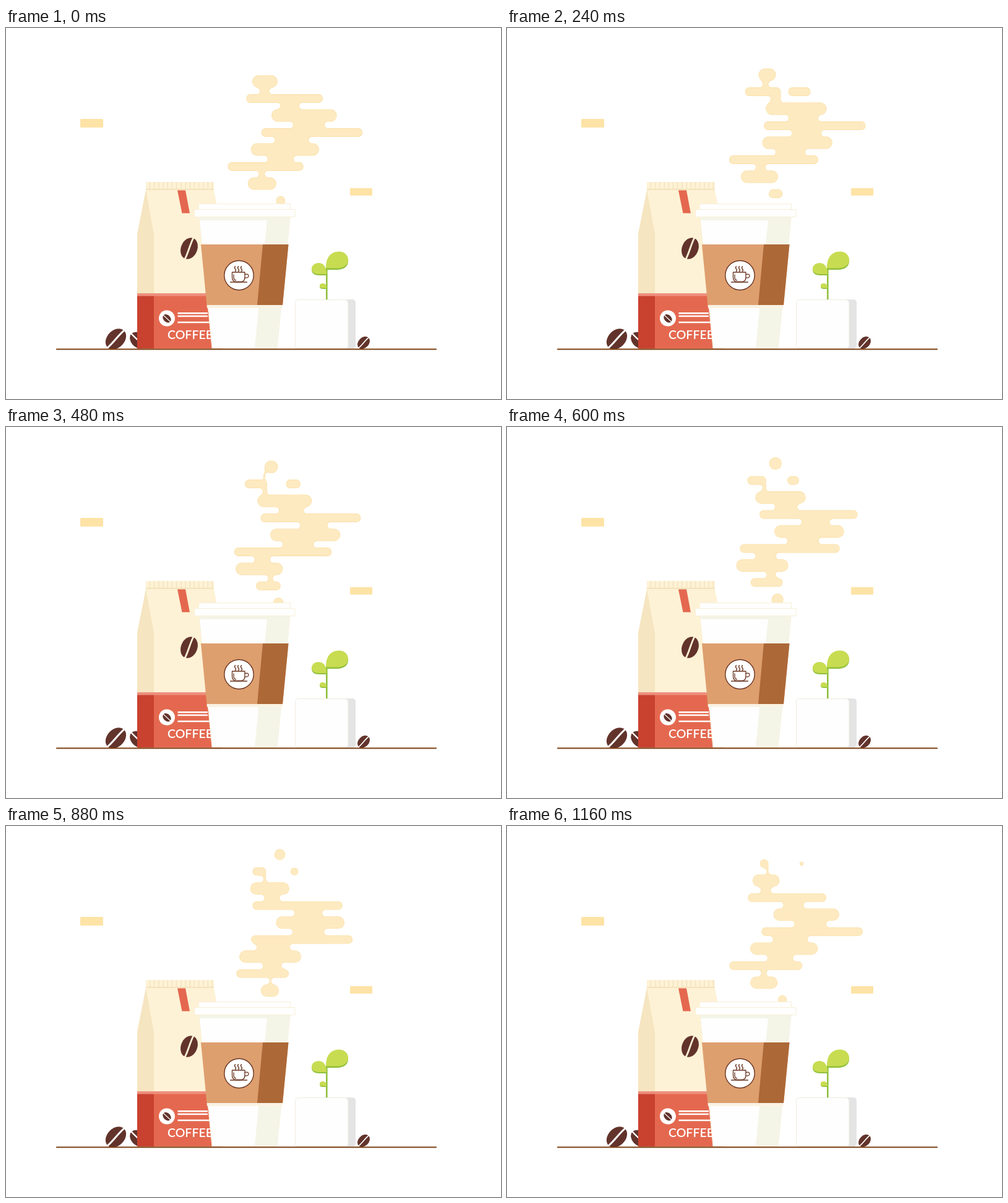
An HTML page for the animation above (1.2 s loop, 800 by 600 pixels).

```html
<!DOCTYPE html>
<html lang="en">
<head>
<meta charset="utf-8">
<title>Coffee to go</title>
<style>
  html, body { margin: 0; width: 100%; height: 100%; overflow: hidden; background: #fff; }
  svg { display: block; width: 100vw; height: 100vh; }
  #steam { fill: #fdeac1; stroke: #fbdc9b; stroke-width: 1.2; paint-order: stroke; }
  .dash { fill: #fee3a6; }
  .cream { fill: #fef2d6; }
  .fold { fill: #f5e5c0; }
  .red { fill: #e4684f; }
  .paper { fill: #fefefe; }
  .shade { fill: #f4f4e7; }
  .edge { stroke: #f7efd8; stroke-width: 1; }
  .leaf { fill: #c8dc51; }
  .under { fill: #90c03d; }
  .icon { fill: none; stroke: #6b3623; stroke-width: 1.3; stroke-linecap: round; stroke-linejoin: round; }
  .label { font: 600 19.5px Lato, "Open Sans", sans-serif; fill: #fff; }
</style>
</head>
<body>
<svg viewBox="0 0 800 600" preserveAspectRatio="xMidYMid meet">
  <defs>
    <g id="bean">
      <ellipse rx="14" ry="19" fill="#62332b"/>
      <path d="M0 -20C-1.5 -8 1.5 8 0 20" fill="none" stroke="currentColor" stroke-width="3"/>
    </g>
    <pattern id="ribs" x="226" y="249" width="7.2" height="14" patternUnits="userSpaceOnUse">
      <rect x="6" width="1.6" height="14" fill="#f0dfb8"/>
    </pattern>
  </defs>

  <rect class="dash" x="120" y="147" width="37" height="14" rx="1.5"/>
  <rect class="dash" x="556" y="259" width="36" height="12" rx="1"/>

  <g color="#fff">
    <use href="#bean" transform="translate(177.5 503) rotate(44)"/>
    <use href="#bean" transform="translate(213.5 505) rotate(-45) scale(.8)"/>
    <use href="#bean" transform="translate(578 509) rotate(44) scale(.6)"/>
  </g>

  <!-- bag -->
  <path class="cream" d="M226 249H336V262L350 333V518H226Z"/>
  <path class="fold" d="M226 262L212 333V518H239V333Z"/>
  <rect x="226" y="249" width="110" height="12" fill="url(#ribs)"/>
  <rect x="226" y="260" width="110" height="2" fill="#f3e2bb"/>
  <path class="red" d="M277 262.5H290L297 299.5H284.5Z"/>
  <rect class="red" x="239" y="433" width="111" height="85.5"/>
  <rect x="212" y="433" width="27" height="85.5" fill="#c9412f"/>
  <rect x="212" y="429" width="138" height="4.500" fill="#ee8f7e"/>
  <use href="#bean" color="#fef2d6" transform="translate(296 356.5) rotate(22) scale(.94)"/>
  <circle cx="260" cy="469.5" r="13" fill="#fff"/>
  <use href="#bean" color="#fff" transform="translate(260 469.8) rotate(-45) scale(.4)"/>
  <path d="M277.5 461.200H326M277.5 466H326M277.5 476H340" stroke="#fff" stroke-width="2.4"/>
  <text class="label" x="261" y="503">COFFEE</text>

  <path id="steam"/>

  <!-- cup -->
  <path class="paper edge" d="M312 306H459L438 518H333Z"/>
  <path class="shade" d="M312.5 306H459L438 518H402L422 311H313Z"/>
  <path d="M324.5 448H447L446.5 453H325Z" fill="#faf3e3"/>
  <path d="M315 350H456.5L447 448H324.5Z" fill="#de9f6f"/>
  <path d="M415 350H456.5L447 448H406Z" fill="#ad6837"/>
  <rect class="paper edge" x="311.5" y="284.5" width="148" height="9.5"/>
  <rect class="paper edge" x="304.5" y="293.5" width="162.5" height="12"/>
  <circle cx="376.5" cy="400" r="23.7" fill="#fff" stroke="#6b3623" stroke-width="1.4"/>
  <g class="icon">
    <path d="M365.5 395H386V403Q386 410.5 379 410.5H372.5Q365.5 410.5 365.5 403Z"/>
    <path d="M386 398.5Q392 397 392 401Q392 404.5 386 404"/>
    <path d="M368 399V403Q368 407.5 371.5 408"/>
    <path d="M362.5 411H389.5"/>
    <path d="M370.5 385.5q-2 2.3 0 4.3t0 4M375.5 385.5q-2 2.3 0 4.3t0 4M380.5 385.5q-2 2.3 0 4.3t0 4"/>
  </g>

  <!-- plant -->
  <rect x="500" y="439" width="65" height="79.5" rx="5" fill="#e4e4e4"/>
  <rect class="paper" x="467.5" y="439.5" width="85.5" height="79" rx="5" stroke="#efebe0"/>
  <path d="M518.3 388V439" stroke="#90c03d" stroke-width="2.6"/>
  <path class="under" d="M517.5 391C516 375 524 363 538 363C547 363 553 369 553 377C553 386 545 391 535 391Z"/>
  <path class="leaf" d="M517.5 388.5C516 373 524 361.5 538 361.5C547 361.5 553 367.5 553 375C553 383.5 545 388.5 535 388.5Z"/>
  <path class="under" d="M518 400H506C499 400 494 397 494 391C494 385 499 381 505 381C513 381 518 387 518 400Z"/>
  <path class="leaf" d="M518 398H506C499 398 494 395 494 389.5C494 384 499 380 505 380C513 380 518 386 518 398Z"/>
  <path class="under" d="M518 422H512Q507 422 507 418Q507 414 512 414Q518 414 518 422Z"/>
  <path class="leaf" d="M518 420.5H512Q507 420.5 507 417Q507 413 512 413Q518 413 518 420.5Z"/>

  <path d="M82 519.5H695" stroke="#7b3f10" stroke-width="2.2" stroke-linecap="round"/>
</svg>

<script>
const LOOP = 1200, STEP = 40;
const RISE = 55, GAP = RISE / 2, NOTCH = 6;
const FAT_H = 18.6, THIN_H = 12.6;
const FAT_END = 45, THIN_END = 60, SPLIT_Y = 112;

// An edge swings between [height, x] turning points on half cosine waves
function swing(...turns) {
  return y => {
    let i = 0;
    while (i < turns.length - 2 && turns[i + 1][0] < y) i++;
    const [y0, x0] = turns[i], [y1, x1] = turns[i + 1];
    const u = Math.min(1, Math.max(0, (y - y0) / (y1 - y0)));
    return x0 + (x1 - x0) * (1 - Math.cos(Math.PI * u)) / 2;
  };
}

const fat = {
  left: swing([36, 437], [98, 395], [158, 437], [225, 371], [295, 436]),
  right: swing([44, 451], [76, 434], [160, 547], [247, 436], [296, 450])
};
const thin = {
  left: swing([45, 415], [100, 385], [161, 416], [219, 358], [290, 442]),
  right: swing([50, 482], [81, 470], [159, 579], [259, 443], [295, 456])
};
const belowFat = {
  left: swing([75, 419], [102, 411], [163, 466], [228, 416], [258, 430]),
  right: swing([78, 416], [98, 424], [162, 516], [250, 430])
};
const belowThin = {
  left: swing([70, 421], [98, 414], [156, 477], [203, 402], [226, 403], [258, 430]),
  right: swing([70, 422], [98, 418], [152, 521], [230, 416], [258, 430])
};

const fmt = pts => pts.map(p => p[0].toFixed(2) + " " + p[1].toFixed(2)).join(" ");

function pill({ l, r, y, h }) {
  const c = Math.min(h, r - l) / 2;
  if (c < 0.4) return "";
  const arc = `A${c} ${c} 0 0 1 `, start = fmt([[l + c, y - c]]);
  return `M${start}H${r - c}${arc}${fmt([[r - c, y + c]])}H${l + c}${arc}${start}Z`;
}

// Concave curve from a row to the waist of a neck
function flare(row, edge, x, y, dir) {
  const dy = y - row.y, down = Math.sign(dy), half = row.h / 2;
  if (dir * (edge - x) - half >= NOTCH) {
    const top = row.y + down * (half - 0.2);
    return [[x + dir * NOTCH, top], [x + dir * 2.7, top], [x, y - down * 3.3], [x, y]];
  }
  return [[edge, row.y], [edge, row.y + dy * 0.55], [x, y - dy * 0.45], [x, y]];
}

function neck(up, low, shape, y) {
  const l = shape.left(y), r = shape.right(y);
  const ur = flare(up, up.r, r, y, 1), lr = flare(low, low.r, r, y, 1).reverse();
  const ll = flare(low, low.l, l, y, -1), ul = flare(up, up.l, l, y, -1).reverse();
  return `M${fmt(ur.slice(0, 1))}C${fmt(ur.slice(1))}C${fmt(lr.slice(1))}` +
    `L${fmt(ll.slice(0, 1))}C${fmt(ll.slice(1))}C${fmt(ul.slice(1))}Z`;
}

// Height of the waist under a row whose pill is h tall
const waistBelow = (y, h) => y + (h + GAP - (FAT_H + THIN_H) / 2) / 2;

function fatRow(y) {
  const l = fat.left(y), r = fat.right(y);
  return { l, r, y, h: Math.min(FAT_H, r - l) };
}

// High up, a thin row tears in two; the torn-off piece shrinks to a dot
function thinRow(y) {
  const row = { l: thin.left(y), r: thin.right(y), y, h: THIN_H };
  if (y < SPLIT_Y) {
    row.rest = { ...row, l: 453 + (y - 93) ** 2 / 50 };
    row.r = belowThin.right(waistBelow(y, THIN_H));
  }
  return row;
}

function steamPath(phase) {
  let d = "";
  for (let y = 306.5 - RISE * phase; y > FAT_END; y -= RISE) {
    const row = fatRow(y), waist = waistBelow(y, FAT_H);
    d += pill(row);
    if (waist > 78 && waist < 250) d += neck(row, thinRow(y + GAP), belowFat, waist);
  }
  for (let y = 334 - RISE * phase; y >= THIN_END; y -= RISE) {
    const row = thinRow(y), waist = waistBelow(y, THIN_H);
    d += pill(row);
    if (row.rest) d += pill(row.rest);
    if (waist < 252) d += neck(row, fatRow(y + GAP), belowThin, waist);
  }
  return d;
}

const steam = document.getElementById("steam");
const begin = performance.now();

function draw(now) {
  const t = Math.max(0, now - begin) + 4;
  steam.setAttribute("d", steamPath(Math.floor(t / STEP) * STEP % LOOP / LOOP));
  requestAnimationFrame(draw);
}
draw(begin);
</script>
</body>
</html>
```
